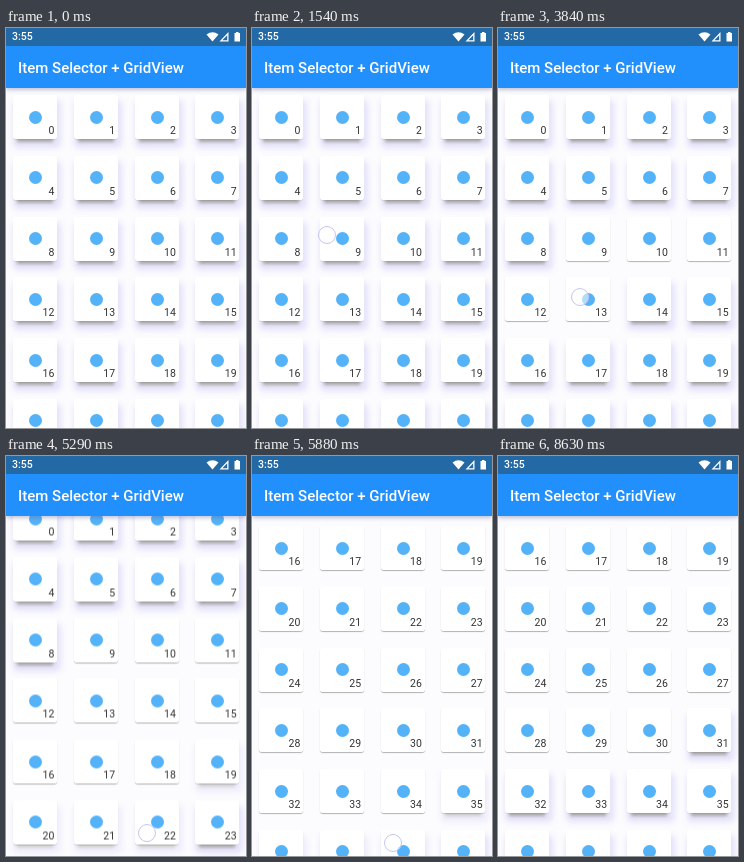
Write an HTML page that moves like this. It is 240 by 400 pixels and loops after 8.75 s.

```html
<!DOCTYPE html>
<html lang="en">
<head>
<meta charset="utf-8">
<title>Item Selector + GridView</title>
<style>
html, body { margin: 0; width: 100%; height: 100%; overflow: hidden; }
body { background: #fcfcfe; font-family: Roboto, sans-serif; }
#stage { position: relative; width: 240px; height: 400px; overflow: hidden; background: #fcfcfe; }
#grid { position: absolute; left: 0; top: 0; will-change: transform; }
.card { position: absolute; width: 44px; height: 44px; }
.card i { position: absolute; inset: 0; border-radius: 3px; }
.low { box-shadow: 0 1px 1px rgba(0, 0, 0, .3); }
.high {
  box-shadow: 0 7px 3px -4px rgba(112, 108, 84, .5),
              2px 7px 6px 2px rgba(178, 172, 240, .33);
}
.card .face { background: #fff; }
.dot { position: absolute; left: 16px; top: 15.5px; width: 13px; height: 13px; border-radius: 50%; background: #54b2f8; }
.card span { position: absolute; right: 2.7px; top: 30px; font-size: 10.5px; line-height: 12px; color: #333; }
#bar {
  position: absolute; left: 0; top: 0; width: 240px; height: 60px; color: #fff;
  background: linear-gradient(#2369a6 18px, #218ffc 18px);
  box-shadow: 0 2px 4px rgba(90, 90, 140, .35);
}
#bar b { position: absolute; font-weight: 500; white-space: nowrap; }
#clock { left: 6px; top: 0; font-size: 10.5px; line-height: 18.6px; }
#title { left: 12px; top: 18.8px; font-size: 15px; line-height: 42px; }
#bar svg { position: absolute; left: 0; top: 0; }
#finger {
  position: absolute; left: -9px; top: -9px; width: 16px; height: 16px; border-radius: 50%;
  border: 1px solid #c3c6ee; background: rgba(255, 255, 255, .55);
}
</style>
</head>
<body>
<div id="stage">
  <div id="grid"></div>
  <div id="bar">
    <b id="clock">3:55</b>
    <b id="title">Item Selector + GridView</b>
    <svg width="240" height="18" fill="#fff">
      <path d="M200.5 6.5Q206.5 2 212.5 6.5L206.5 13.5Z"/>
      <path d="M222.5 4V13.5H213.5ZM221.2 7.2L216.4 12.3H221.2Z" fill-rule="evenodd"/>
      <path d="M228.5 5H230V4H232.500V5H234V13.500H228.500Z"/>
    </svg>
  </div>
  <div id="finger"></div>
</div>
<script>
const LOOP = 8750, PITCH = 60.75, COLS = 4, COUNT = 48;
const FIRST = 9, PRESS = 2020, SHOW = 1250, LIFT = 6760;
const FADE = 240, SAMPLES = 24;

// time, x, y
const path = [
  [SHOW, 75, 207], [2300, 75, 207], [3840, 82, 269], [4900, 141, 320],
  [5290, 141, 377], [5500, 141, 387], [5960, 141, 387],
  [6400, 141, 310], [6460, 141, 289], [LIFT, 141, 289]
];
// time, offset
const scrolling = [[5223, 0], [5500, 108], [5840, 240]];

const grid = document.getElementById('grid');
const finger = document.getElementById('finger');

function add(parent, tag, cls) {
  const el = document.createElement(tag);
  el.className = cls;
  return parent.appendChild(el);
}

const shadows = Array.from({ length: COUNT }, (_, i) => {
  const card = add(grid, 'div', 'card');
  card.style.left = 7 + (i % COLS) * PITCH + 'px';
  card.style.top = 67 + Math.floor(i / COLS) * PITCH + 'px';
  const low = add(card, 'i', 'low');
  const high = add(card, 'i', 'high');
  add(card, 'i', 'face');
  add(card, 'div', 'dot');
  add(card, 'span', '').textContent = i;
  return { low, high };
});

function track(keys, t, col) {
  if (t <= keys[0][0]) return keys[0][col];
  for (let k = 1; k < keys.length; k++) {
    const a = keys[k - 1], b = keys[k];
    if (t <= b[0]) return a[col] + (b[col] - a[col]) * (t - a[0]) / (b[0] - a[0]);
  }
  return keys[keys.length - 1][col];
}

// Last item of the selected range at time t
function lastItem(t) {
  if (t < PRESS) return -1;
  const y = track(path, t, 2) + track(scrolling, t, 1);
  const row = Math.floor((y - 58.6) / PITCH);
  return row * COLS + Math.floor((track(path, t, 1) + 1.5) / PITCH);
}

function draw(t) {
  grid.style.transform = `translateY(${-track(scrolling, t, 1)}px)`;
  finger.style.display = t >= SHOW && t < LIFT ? 'block' : 'none';
  finger.style.transform = `translate(${track(path, t, 1)}px, ${track(path, t, 2)}px)`;

  // Averaging the selection over the fade window eases each card's elevation
  const lasts = Array.from({ length: SAMPLES }, (_, k) => lastItem(t - k * FADE / SAMPLES));
  shadows.forEach(({ low, high }, i) => {
    const picked = i < FIRST ? 0 : lasts.filter(last => i <= last).length / SAMPLES;
    low.style.opacity = 0.4 + 0.6 * picked;
    high.style.opacity = 1 - picked;
  });
}

const start = performance.now();
function tick() {
  draw((performance.now() - start) % LOOP);
  requestAnimationFrame(tick);
}
tick();
</script>
</body>
</html>
```
